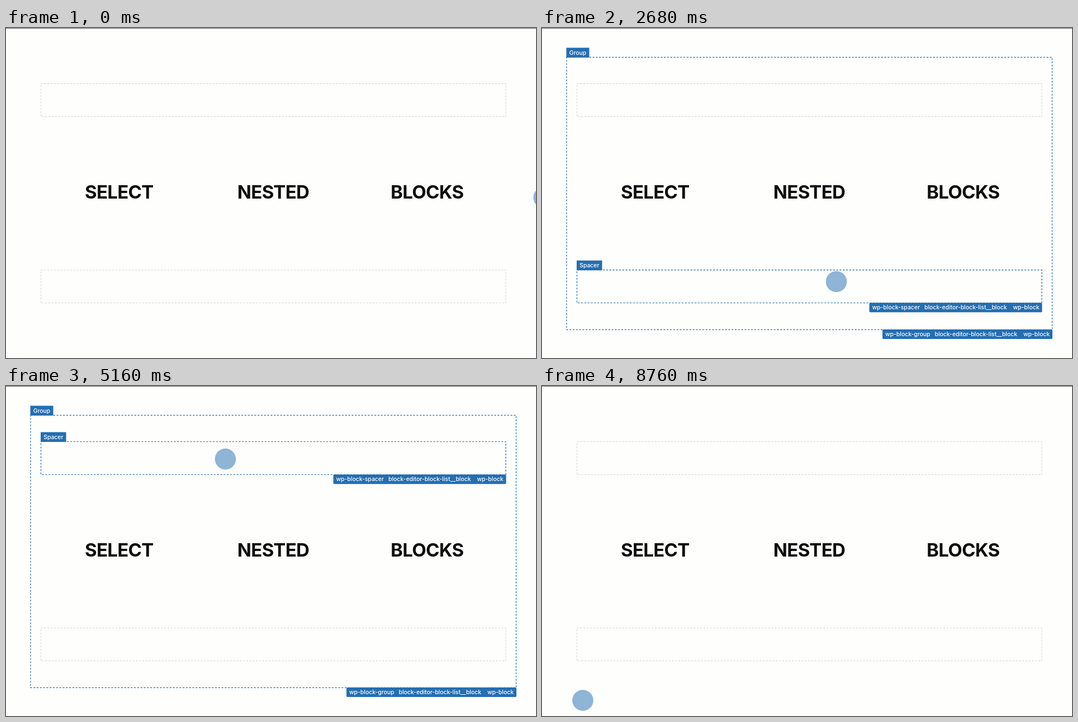
An HTML page that plays this animation: 948x590 px, repeating every 8.8 s.

```html
<!DOCTYPE html>
<html lang="en">
<head>
<meta charset="utf-8">
<title>Select nested blocks</title>
<style>
  html, body { margin: 0; width: 100%; height: 100%; overflow: hidden; background: #fefefd; }
  svg { display: block; width: 948px; height: 590px; font-family: Inter, Roboto, sans-serif; }
  .title { font-size: 33px; font-weight: 700; letter-spacing: -.7px; text-anchor: middle; fill: #0e0e0e; }
  .frame { fill: none; stroke-width: 1.2; stroke-dasharray: 3.3 2.5; stroke: #2470b3; }
  .idle { stroke: #d3d3d3; stroke-width: 1; }
  .tag { fill: #246eb1; }
  .label { font-size: 10.4px; font-weight: 500; fill: #fff; }
  #cursor { fill: #246eb1; fill-opacity: .51; }
</style>
</head>
<body>
<svg id="stage" viewBox="0 0 948 590">
  <rect width="948" height="1" fill="#5c5c5c"/>
  <g id="idle"></g>
  <text class="title" x="202.3" y="305">SELECT</text>
  <text class="title" x="478" y="305">NESTED</text>
  <text class="title" x="753.2" y="305">BLOCKS</text>
  <g id="blocks"></g>
  <circle id="cursor" r="18.8"/>
</svg>
<script>
const LOOP = 8800, STEP = 40;
const listBlock = 'block-editor-block-list__block';

function add(parent, tag, attrs, text) {
  const el = document.createElementNS('http://www.w3.org/2000/svg', tag);
  for (const key in attrs) el.setAttribute(key, attrs[key]);
  if (text) el.textContent = text;
  parent.appendChild(el);
  return el;
}

function frame(parent, cls, [left, top, right, bottom]) {
  add(parent, 'rect', { class: cls, x: left, y: top, width: right - left, height: bottom - top });
}

// words: pairs of text and start position
function addBlock(name, box, tabWidth, words) {
  const [left, top, right, bottom] = box;
  const el = add(document.getElementById('blocks'), 'g', { visibility: 'hidden' });
  frame(el, 'frame', box);
  add(el, 'rect', { class: 'tag', x: left - .5, y: top - 17, width: tabWidth, height: 17.5 });
  add(el, 'text', { class: 'label', x: left + 4.7, y: top - 4.7 }, name);
  const start = words[0][1] - 5;
  add(el, 'rect', { class: 'tag', x: start, y: bottom - .3, width: right + .5 - start, height: 17, rx: 1.8 });
  for (const [word, x] of words) add(el, 'text', { class: 'label', x, y: bottom + 11.8 }, word);
  return { el, box };
}

const spacers = [[62.5, 99.5, 894, 158.5], [62.5, 432.7, 894, 491.5]];
spacers.forEach(box => frame(document.getElementById('idle'), 'frame idle', box));

const blocks = [
  addBlock('Group', [44, 52.3, 912.5, 539.3], 41,
    [['wp-block-group', 614], [listBlock, 702.5], ['wp-block', 861]]),
  addBlock('Columns', [62.5, 186.3, 894, 405], 54,
    [['wp-block-columns', 421], [listBlock, 522], ['wp-block', 681], ['block-editor-block-list__layout', 735.7]]),
  ...spacers.map(box => addBlock('Spacer', box, 45.5,
    [['wp-block-spacer', 590.5], [listBlock, 684], ['wp-block', 842.5]]))
];
for (const x of [81, 356.4, 631.6]) {
  blocks.push(addBlock('Column', [x, 205.3, x + 243.6, 386.7], 48.5,
    [['wp-block-column', x + 6.8], ['block-editor-block-list__...', x + 102.6]]));
  blocks.push(addBlock('Heading', [x + 18.6, 250.3, x + 225, 335], 52,
    [['block-editor-rich-text__editable', x + 25.4], ['bl...', x + 197]]));
}

// time, x, y
const path = [
  [0, 962, 303], [300, 850, 304], [800, 748, 298], [1270, 748, 298],
  [1560, 725.5, 400], [2000, 690, 462], [2300, 690, 462],
  [2680, 526.5, 453.5], [3200, 484, 351], [3720, 476, 300], [4010, 476, 300],
  [4200, 461.5, 239], [4340, 461.3, 238], [5200, 392, 130], [5250, 392, 130],
  [5920, 254.8, 203.6], [6180, 226, 240], [6640, 203, 296], [7010, 203, 296],
  [7320, 183.5, 386], [7920, 125, 470], [8760, 73, 562]
];

const slope = (i, axis) => (path[i + 1][axis] - path[i][axis]) / (path[i + 1][0] - path[i][0]);

function tangent(i, axis) {
  if (i === 0) return slope(0, axis);
  if (i === path.length - 1) return 0;
  const a = slope(i - 1, axis), b = slope(i, axis);
  return a * b > 0 ? 2 * a * b / (a + b) : 0;
}

// Monotone cubic between path points
function position(t, axis) {
  const last = path.length - 1;
  if (t >= path[last][0]) return path[last][axis];
  const i = path.findIndex(p => p[0] > t) - 1;
  const span = path[i + 1][0] - path[i][0];
  const u = (t - path[i][0]) / span, v = 1 - u;
  return path[i][axis] * v * v * (1 + 2 * u) + path[i + 1][axis] * u * u * (3 - 2 * u)
    + span * u * v * (tangent(i, axis) * v - tangent(i + 1, axis) * u);
}

const cursor = document.getElementById('cursor');
const begin = performance.now();

function draw() {
  const t = Math.floor((performance.now() - begin) % LOOP / STEP) * STEP;
  const x = position(t, 1), y = position(t, 2);
  cursor.setAttribute('cx', x);
  cursor.setAttribute('cy', y);
  for (const { el, box: [left, top, right, bottom] } of blocks) {
    const inside = x > left && x < right && y > top && y < bottom;
    el.setAttribute('visibility', inside ? 'visible' : 'hidden');
  }
  requestAnimationFrame(draw);
}
draw();
</script>
</body>
</html>
```
